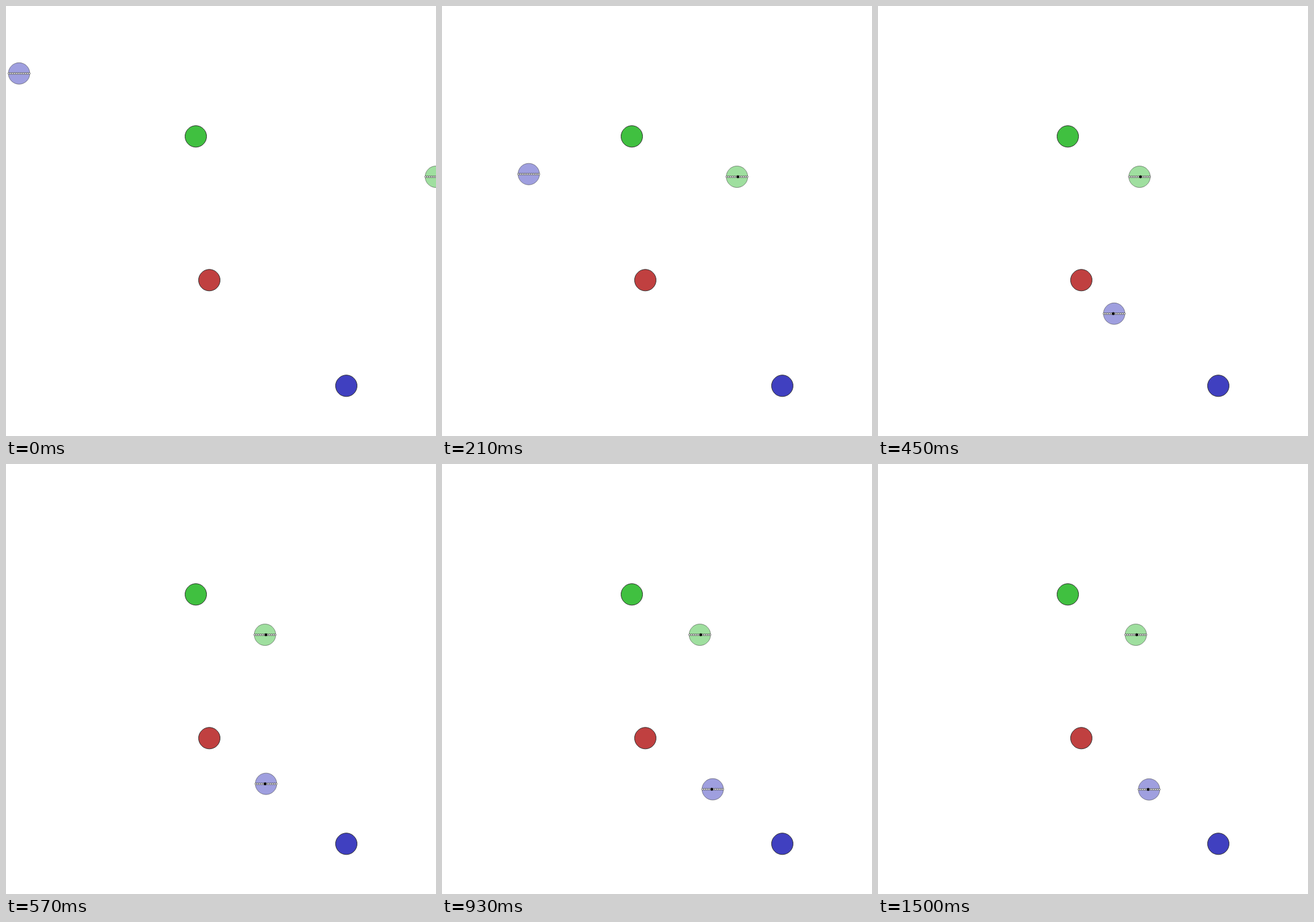
These frames come from a looping animation (700 by 700 pixels, 1.53 s). An HTML page with a canvas:

```html
<!DOCTYPE html>
<html lang="en">
<head>
<meta charset="utf-8">
<title>Homing discs</title>
<style>
  html, body { margin: 0; width: 100%; height: 100%; overflow: hidden; background: #fff; }
  canvas { display: block; width: 700px; height: 700px; }
</style>
</head>
<body>
<canvas id="stage" width="700" height="700"></canvas>
<script>
const ctx = document.getElementById('stage').getContext('2d');
const STEP = 30, STEPS = 51;
const RADIUS = 17.5, SENSORS = 12, PITCH = 3;
const GROWTH = 1 / 0.9, EASE = 0.75;

const landmarks = [
  { x: 309, y: 212.3, color: '#40c040' },
  { x: 331, y: 446.3, color: '#c04040' },
  { x: 554, y: 618.3, color: '#4040c0' }
];

// Each agent speeds up from start to turn, then eases into home.
const agents = [
  { color: '#40c040', start: [699.8, 278], turn: [563.2, 278], home: [419.7, 278], turnStep: 4, active: 6 },
  { color: '#4040c0', start: [21.3, 109.8], turn: [261.7, 438.3], home: [441.3, 529.8], turnStep: 11, active: 5 }
];

const mix = (a, b, t) => a.map((v, i) => v + (b[i] - v) * t);

function position(agent, step) {
  const { start, turn, home, turnStep } = agent;
  if (step > turnStep) return mix(home, turn, EASE ** (step - turnStep));
  return mix(start, turn, (GROWTH ** step - 1) / (GROWTH ** turnStep - 1));
}

function circle(x, y, r, fill, stroke) {
  ctx.beginPath();
  ctx.arc(x, y, r, 0, Math.PI * 2);
  ctx.fillStyle = fill;
  ctx.fill();
  ctx.strokeStyle = stroke;
  ctx.stroke();
}

function drawAgent(agent, step) {
  const [x, y] = position(agent, step);
  const sensorX = i => x + (i - (SENSORS - 1) / 2) * PITCH;
  ctx.globalAlpha = 0.5;
  circle(x, y, RADIUS, agent.color, '#333');
  ctx.globalAlpha = 1;
  ctx.lineWidth = 0.8;
  for (let i = 0; i < SENSORS; i++) circle(sensorX(i), y, 1.5, '#fff', '#444');
  if (step > agent.turnStep) circle(sensorX(agent.active), y, 2, '#000', '#000');
  ctx.lineWidth = 1;
}

function draw() {
  const step = Math.floor(performance.now() / STEP) % STEPS;
  ctx.clearRect(0, 0, 700, 700);
  ctx.lineWidth = 1;
  for (const { x, y, color } of landmarks) circle(x, y, RADIUS, color, '#333');
  for (const agent of agents) drawAgent(agent, step);
  requestAnimationFrame(draw);
}

draw();
</script>
</body>
</html>
```
